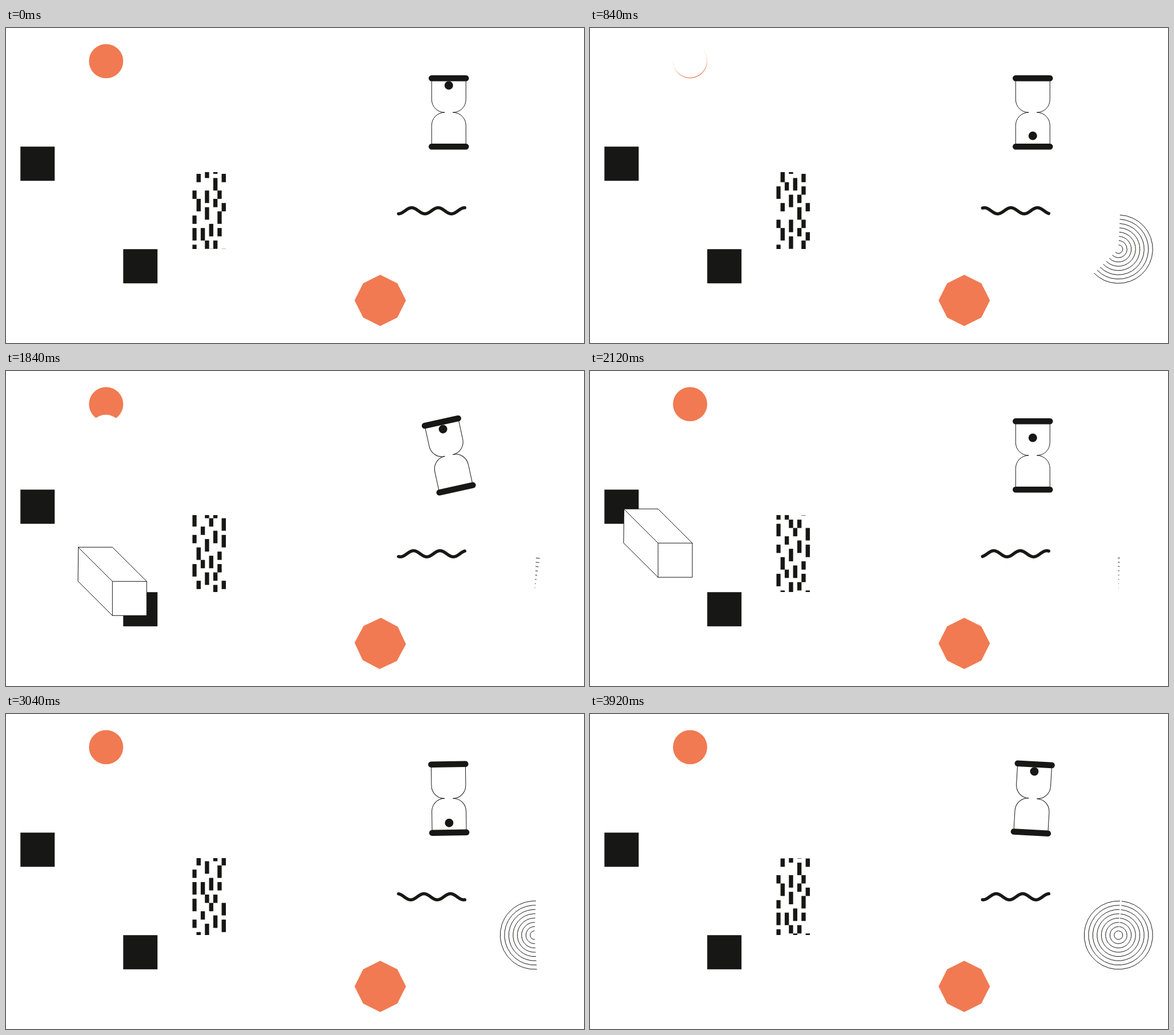
Animation, 1012 px wide and 553 px high, one loop 3960 ms. Source, as an HTML page with a canvas:

```html
<!DOCTYPE html>
<html lang="en">
<head>
<meta charset="utf-8">
<title>Moving shapes</title>
<style>
html, body { margin: 0; width: 100%; height: 100%; overflow: hidden; background: #fff; }
canvas { display: block; }
</style>
</head>
<body>
<canvas id="stage" width="1012" height="553"></canvas>
<script>
const ctx = document.getElementById('stage').getContext('2d');
const LOOP = 3960, STEP = 40, TAU = Math.PI * 2, RAD = Math.PI / 180;
const BLACK = '#171715', ORANGE = '#f17a52', WHITE = '#fff';

const clamp = x => Math.min(1, Math.max(0, x));
const phase = (t, from, to) => clamp((t - from) / (to - from));
const smooth = u => u * u * (3 - 2 * u);
const easeOut = u => 1 - (1 - u) ** 2;

function disc(x, y, r, color) {
  ctx.fillStyle = color;
  ctx.beginPath();
  ctx.arc(x, y, r, 0, TAU);
  ctx.fill();
}

function trace(points, closed) {
  ctx.beginPath();
  points.forEach(([x, y]) => ctx.lineTo(x, y));
  if (closed) ctx.closePath();
}

function scoped(draw) {
  ctx.save();
  draw();
  ctx.restore();
}

function clipTo(x, y, w, h) {
  ctx.beginPath();
  ctx.rect(x, y, w, h);
  ctx.clip();
}

// A white disc slides over the orange one, rests, then falls away.
function moon(t) {
  disc(175, 58, 30, ORANGE);
  const y = t < 815
    ? 56.7 - 60.5 * (1 - t / 815) ** 2
    : 56.7 + 4.75e-5 * (t - 815) ** 2;
  if (t > 0 && y < 120) disc(174.6, y, 30, WHITE);
}

// A white prism travels from the lower square to the upper one.
function prism(t) {
  ctx.fillStyle = BLACK;
  ctx.fillRect(25, 208, 60, 60);
  ctx.fillRect(205, 388, 60, 60);
  const w = t - 1162;
  const x = 265 - 0.18 * w - 3.67e-5 * w * w;
  if (w < 0 || x < -35) return;
  scoped(() => {
    // The front face may stand out past the upper square, hence one large window.
    clipTo(25, 208, 240, 240);
    ctx.translate(x, x + 183);
    ctx.fillStyle = WHITE;
    ctx.lineWidth = 1;
    trace([[0, 0], [60, 0], [120, 60], [120, 120], [60, 120], [0, 60]], true);
    ctx.fill();
    ctx.stroke();
    trace([[0, 0], [60, 60], [120, 60]]);
    ctx.stroke();
    trace([[60, 60], [60, 120]]);
    ctx.stroke();
  });
}

// Per column: start rows of the long (3) and short (2) dashes, in 33 rows.
const ROWS = 33, UNIT = 7.315;
const DASHES = [
  [[-16, -4, 13], [-11, 4, 10]],
  [[-8, 6], [0]],
  [[13], [-13, -5]],
  [[-10, -2, 4, 8], [16]],
  [[-6, 12], [-15]],
  [[-12, 1], [-2, 6, 16]],
  [[9], [-7, -4, 4, 13]],
  [[-15, -11], [0, 7]]
];

function rain(t) {
  const shift = t / LOOP * ROWS;
  scoped(() => {
    clipTo(326, 252.8, 59, 135);
    ctx.fillStyle = BLACK;
    DASHES.forEach((lists, col) => lists.forEach((starts, i) => starts.forEach(row => {
      const r = (row + shift + 3 + 2 * ROWS) % ROWS - 3;
      ctx.fillRect(326 + col * 7.33, 255.8 + r * UNIT, 7.4, (3 - i) * UNIT);
    })));
  });
}

function hourglass(t) {
  const turn = 180 * (smooth(phase(t, 1000, 2000)) - smooth(phase(t, 3000, 4000)));
  const second = t >= 2000;
  const s = t % 2000, rest = second ? 42.5 : 41;
  const ball = s < 1000
    ? -47.5 + (47.5 + rest) * smooth(phase(s, 0, 440))
    : rest + (47.5 - rest) * easeOut(phase(s, 1000, 2000));
  scoped(() => {
    ctx.translate(775, 148);
    ctx.rotate(turn * RAD);
    ctx.lineWidth = 1;
    for (const sx of [-1, 1]) for (const sy of [-1, 1]) {
      ctx.beginPath();
      ctx.moveTo(30 * sx, 60 * sy);
      ctx.lineTo(30 * sx, 23 * sy);
      ctx.bezierCurveTo(30 * sx, 10 * sy, 20 * sx, 0, 7.5 * sx, 0);
      ctx.stroke();
    }
    ctx.lineWidth = 10.5;
    for (const y of [-60, 60]) {
      trace([[-30, y], [30, y]]);
      ctx.stroke();
    }
    disc(0, second ? -ball : ball, 7.5, BLACK);
  });
}

function wave(t) {
  const length = 46.4, crest = 710 - 2 * length * t / LOOP;
  const points = [];
  for (let x = 687; x <= 803; x++) {
    points.push([x, 320.6 - 5.3 * Math.cos((x - crest) / length * TAU)]);
  }
  ctx.lineWidth = 5.5;
  trace(points);
  ctx.stroke();
}

function rings(t) {
  const seam = -87.5;
  const from = t < 2000 ? seam : seam - 360 * smooth(phase(t, 2000, 4030));
  const to = t < 2000 ? seam + 360 * (1 - smooth(phase(t, 0, 2000))) : seam;
  if (to <= from) return;
  ctx.lineWidth = 1;
  scoped(() => {
    ctx.lineCap = 'butt';
    for (let i = 1; i <= 8; i++) {
      ctx.beginPath();
      ctx.arc(925, 388, i * 7.5, from * RAD, to * RAD);
      ctx.stroke();
    }
  });
}

// A quarter turn that springs past its end and settles.
function octagon(t) {
  const s = Math.max(0, t - 900);
  const turn = -90 * (1 - Math.exp(-0.0043 * s) * Math.cos(0.0065 * s));
  const points = [];
  for (let i = 0; i < 8; i++) {
    const a = (i * 45 + turn) * RAD, r = i % 2 ? 42.4 : 45;
    points.push([655 + r * Math.cos(a), 478 + r * Math.sin(a)]);
  }
  ctx.fillStyle = ORANGE;
  trace(points, true);
  ctx.fill();
}

function draw() {
  const t = Math.floor(performance.now() % LOOP / STEP) * STEP;
  ctx.setTransform(1, 0, 0, 1, 0, 0);
  ctx.fillStyle = WHITE;
  ctx.fillRect(0, 0, 1012, 553);
  ctx.translate(0.25, 0.25);
  ctx.strokeStyle = BLACK;
  ctx.lineCap = ctx.lineJoin = 'round';
  for (const part of [moon, prism, rain, hourglass, wave, rings, octagon]) part(t);
  requestAnimationFrame(draw);
}
draw();
</script>
</body>
</html>
```
